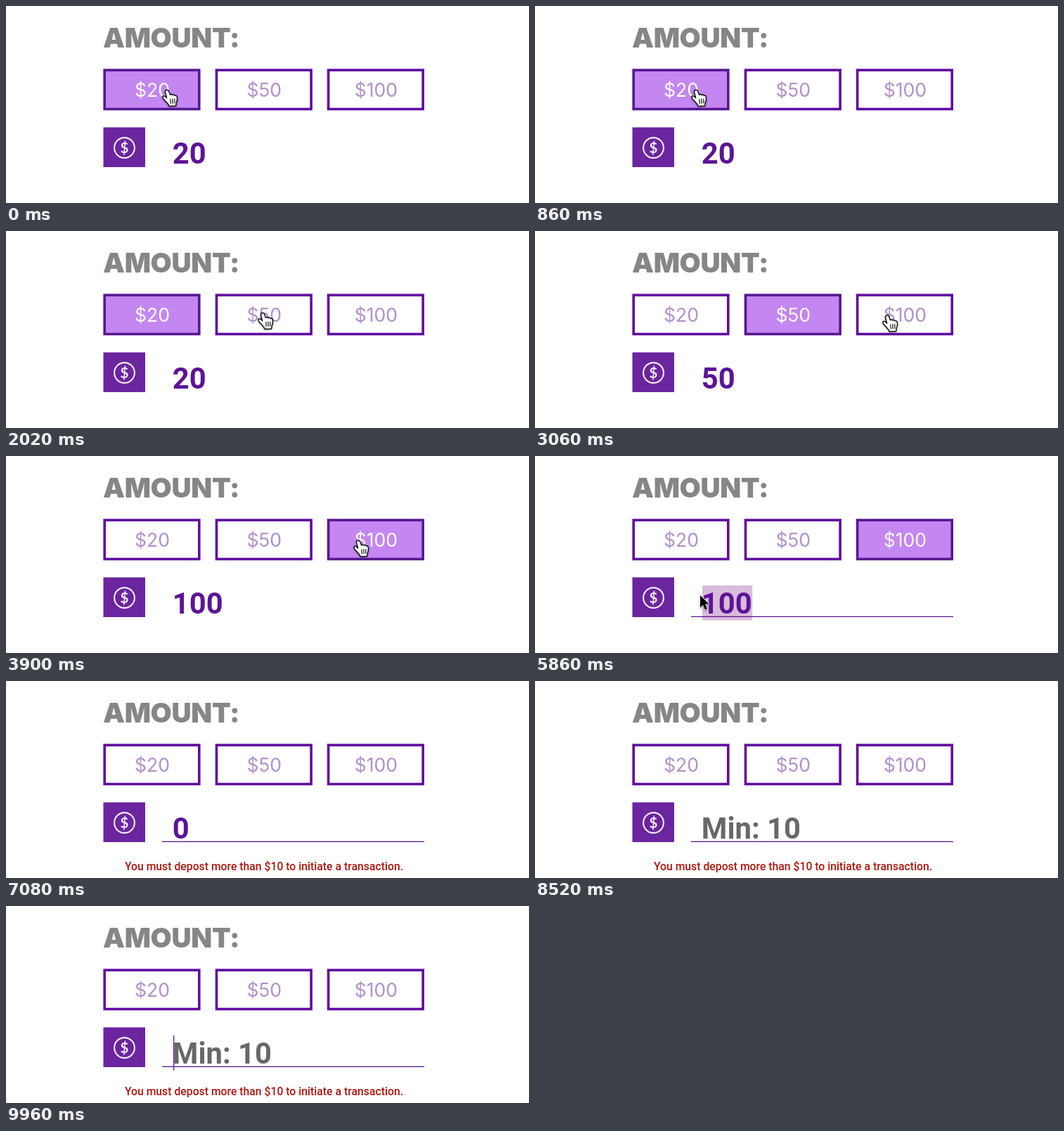
These frames come from a looping animation (744 by 280 pixels, 10 s). An HTML page:

```html
<!DOCTYPE html>
<html lang="en">
<head>
<meta charset="utf-8">
<title>Amount</title>
<style>
html, body { margin: 0; width: 100%; height: 100%; overflow: hidden; background: #fff; }
svg { display: block; width: 744px; height: 280px; }
.title { font: 900 39px Inter, sans-serif; letter-spacing: -0.35px; fill: #868686; }
.choice { font: 400 26.6px Inter, sans-serif; text-anchor: middle; }
.value { font: 700 41.8px Roboto, sans-serif; }
.error { font: 500 15.75px Roboto, sans-serif; text-anchor: middle; fill: #b0160f; }
.icon { font: 700 20.5px Lato, sans-serif; text-anchor: middle; fill: #f6eefb; }
</style>
</head>
<body>
<svg viewBox="0 0 744 280" xmlns="http://www.w3.org/2000/svg">
  <rect width="744" height="280" fill="#fff"/>
  <text class="title" x="138" y="59">AMOUNT:</text>
  <g id="buttons"></g>
  <rect x="138.5" y="172.5" width="59.5" height="56.5" fill="#6b259f"/>
  <circle cx="168.5" cy="201.5" r="14.4" fill="none" stroke="#f6eefb" stroke-width="2.1"/>
  <text class="icon" x="168.5" y="208.8">$</text>
  <rect id="selection" y="184" height="49.5" fill="#d9bcdc"/>
  <rect id="line" x="222" y="227.7" width="373" height="1.3" fill="#5a1a96"/>
  <text id="value" class="value" x="236.8" y="224"></text>
  <rect id="caret" y="184" width="1.3" height="49.5" fill="#5a1a96"/>
  <text id="error" class="error" x="367" y="268.5">You must depost more than $10 to initiate a transaction.</text>
  <g id="cursor" stroke-linejoin="round">
    <g id="hand" transform="translate(-6 -1)" stroke="#111" stroke-width="1.5" stroke-linecap="round" style="filter:drop-shadow(0 1px 1px #0005)">
      <path fill="#fff" d="M5.5 2C7 .5 9 1.5 9.6 3.2L11.6 8.2C12.5 7 14.5 7.2 15 8.6 16 7.6 17.8 8 18.2 9.4 19.6 8.7 21 9.6 21.3 11.2 21.8 14 21.7 16.5 20.4 19L19.6 24 10.2 24.6C9.5 21.8 5.8 18.2 3.2 15.4 1.2 13 .2 11.4 1.2 10.4 2.6 9 4.6 10.4 6.6 12.6L4.6 5C4.2 3.6 4.5 2.6 5.5 2Z"/>
      <path fill="none" stroke-width="1.2" d="M11.8 14.5l.5 6M14.8 14.2l.3 6M17.8 14l.1 6"/>
    </g>
    <path id="arrow" fill="#000" stroke="#fff" stroke-width="1.5" paint-order="stroke" style="filter:drop-shadow(0 1px 1px #0006)" d="M0 0V17.5L4 13.8 6.8 20.5 10 19.2 7.2 12.6H12.6Z"/>
  </g>
</svg>
<script>
const LOOP = 10000, TEXT_X = 238, DIGIT = 23.75, BLINK = 530;
const PICK_50 = 2250, PICK_100 = 3500, FOCUS = 5050, DRAG = 5200, TYPE = 6480, CLEAR = 7700;

const $ = id => document.getElementById(id);
const show = (el, on) => el.setAttribute('visibility', on ? 'visible' : 'hidden');
const clamp = v => Math.min(1, Math.max(0, v));
const mix = (a, b, k) => a + (b - a) * k;
const blend = (a, b, k) => `rgb(${a.map((v, i) => Math.round(mix(v, b[i], k)))})`;

// on/off: when each amount is selected
const buttons = [
  { label: '$20', x: 138, on: -1000, off: PICK_50 },
  { label: '$50', x: 297.3, on: PICK_50, off: PICK_100 },
  { label: '$100', x: 456.4, on: PICK_100, off: TYPE }
];

// time, x, y of the pointer tip
const path = [
  [0, 228, 119], [1000, 228, 119], [1750, 364, 116], [2500, 364, 116],
  [3000, 500, 119.5], [4150, 500, 119.5], [4760, 391, 171],
  [FOCUS, 318, 204], [DRAG, 318, 204], [5740, 235, 198], [LOOP, 235, 198]
];

function add(parent, tag, attrs) {
  const el = document.createElementNS('http://www.w3.org/2000/svg', tag);
  for (const k in attrs) el.setAttribute(k, attrs[k]);
  return parent.appendChild(el);
}

for (const b of buttons) {
  b.box = add($('buttons'), 'rect', { x: b.x + 2.2, y: 91.1, width: 134.6, height: 55.4, 'stroke-width': 3.6 });
  b.text = add($('buttons'), 'text', { class: 'choice', x: b.x + 70, y: 128.7 });
  b.text.textContent = b.label;
}

function pointerAt(t) {
  let i = 0;
  while (i < path.length - 2 && t >= path[i + 1][0]) i++;
  const [t0, x0, y0] = path[i], [t1, x1, y1] = path[i + 1];
  const k = clamp((t - t0) / (t1 - t0)), e = k * k * (3 - 2 * k);
  return [mix(x0, x1, e), mix(y0, y1, e)];
}

function render(t) {
  for (const b of buttons) {
    const k = clamp((t - b.on) / 150) - clamp((t - b.off) / 150);
    b.box.setAttribute('fill', blend([255, 255, 255], [196, 134, 240], k));
    b.box.setAttribute('stroke', blend([95, 12, 160], [86, 24, 146], k));
    b.text.setAttribute('fill', blend([178, 145, 203], [255, 255, 255], k));
  }

  const empty = t >= CLEAR;
  const value = empty ? 'Min: 10' : t >= TYPE ? '0' : t >= PICK_100 ? '100' : t >= PICK_50 ? '50' : '20';
  $('value').textContent = value;
  $('value').setAttribute('fill', empty ? '#686868' : '#5d1497');

  const [x, y] = pointerAt(t);
  const over = y > 89 && y < 148 && buttons.some(b => x > b.x && x < b.x + 139);
  $('cursor').setAttribute('transform', `translate(${x} ${y})`);
  show($('hand'), t < TYPE && over);
  show($('arrow'), t < TYPE && !over);

  // dragging left selects whole digits
  const first = Math.min(3, Math.max(0, Math.round((x - TEXT_X) / DIGIT)));
  const selecting = t >= DRAG && t < TYPE && first < 3;
  $('selection').setAttribute('x', TEXT_X + first * DIGIT);
  $('selection').setAttribute('width', (3 - first) * DIGIT);
  show($('selection'), selecting);

  const edit = empty ? CLEAR : t >= TYPE ? TYPE : FOCUS;
  const lit = Math.floor((t - edit) / BLINK) % 2 === 0;
  $('caret').setAttribute('x', TEXT_X + (empty ? 0 : value.length * DIGIT));
  show($('caret'), t >= FOCUS && !selecting && lit);
  show($('line'), t >= FOCUS);
  show($('error'), t >= TYPE);
}

const start = performance.now();
function tick() {
  render((performance.now() - start) % LOOP);
  requestAnimationFrame(tick);
}
render(0);
requestAnimationFrame(tick);
</script>
</body>
</html>
```
